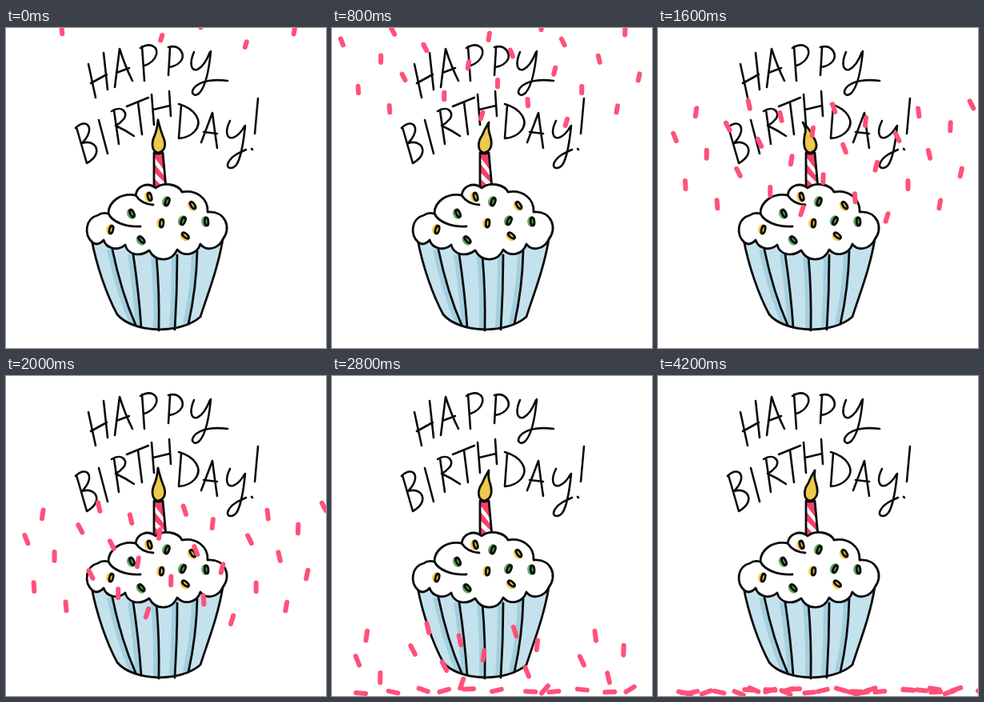
These frames come from a looping animation (400x400 px, 4300 ms). An HTML page:

```html
<!DOCTYPE html>
<html lang="en">
<head>
<meta charset="utf-8">
<title>Happy birthday</title>
<style>
  html, body { margin: 0; width: 100%; height: 100%; overflow: hidden; background: #fff; }
  svg { display: block; width: 100vw; height: 100vh; }
  .ink, .edge { stroke: #0b0b0b; stroke-width: 2.8; stroke-linecap: round; stroke-linejoin: round; }
  .ink { fill: none; }
  .letters { stroke-width: 2.6; }
  .band { fill: none; stroke: #a3cfdf; stroke-width: 6; }
  .confetti { stroke: #ff5179; stroke-width: 6; stroke-linecap: round; }
</style>
</head>
<body>
<svg viewBox="0 0 400 400" role="img" aria-label="Happy birthday!">
  <defs>
    <path id="ribs" d="M133 277Q144 330 162 371M159 283Q166 330 169 374M188 285Q192 330 191 378M214 284Q214 330 211 377M239 279Q238 325 228 370"/>
    <path id="cup" d="M107 264C113 297 126 334 139 358C158 381 217 384 243 361C253 330 265 300 271 264"/>
  </defs>

  <g class="ink letters">
    <!-- HAPPY -->
    <path d="M103 45L112 87M122 31L127 77M106 69L126 58"/>
    <path d="M136 74L142 26Q149 48 158 66M138 56L154 50"/>
    <path d="M170 23L173 66M168 25C181 17 190 24 188 33Q185 43 173 47"/>
    <path d="M205 25L203 59M203 24C216 20 223 31 220 39Q216 47 204 49"/>
    <path d="M235 30C229 44 231 54 239 52Q248 48 255 30M256 29C254 50 250 72 242 81C236 87 230 82 235 75C243 65 262 64 277 66"/>
    <!-- BIRTHDAY! -->
    <path d="M88 124L101 169M87 125C101 111 113 126 95 144C112 138 123 157 101 169"/>
    <path d="M116 115L127 157"/>
    <path d="M135 103L141 145M132 104C146 95 154 108 146 115Q142 120 137 122Q148 127 160 135"/>
    <path d="M151 98L178 87M165 93L170 133"/>
    <path d="M182 83L185 121M204 79L206 110M184 102L205 97"/>
    <path d="M219 97L216 137M216 95C236 101 247 116 236 129Q229 137 216 138"/>
    <path d="M244 143L258 106Q261 130 264 150M247 130L264 132"/>
    <path d="M280 116C273 130 276 139 284 137Q292 134 298 123M299 122C297 142 294 162 288 171C282 178 274 175 278 168C282 160 291 156 300 152"/>
    <path d="M315 88L311 132M307 151L308 152"/>
  </g>

  <path fill="#f83f6b" d="M185 156H196L200 201H185Z"/>
  <path fill="#fff" d="M185 161L197 177V184L185 169ZM185 180L199 194V201L185 188Z"/>
  <path class="ink" d="M185 200V156Q190 158 196 156L200 200"/>
  <path id="flame" class="edge" fill="#edca4c"/>

  <use href="#cup" fill="#c3e2ed"/>
  <use href="#ribs" class="band" x="-4"/>
  <use href="#ribs" class="ink"/>
  <use href="#cup" class="ink"/>

  <path class="edge" fill="#fff" d="M108 268C97 258 99 238 115 234Q120 230 128 232C128 217 143 206 162 209C164 197 177 192 187 200C197 192 215 195 220 205C238 202 253 213 252 230C275 228 282 251 271 264C266 276 250 280 243 270C239 283 223 287 214 277C207 293 187 293 179 278C166 287 152 283 149 271C139 280 125 275 122 265Q115 273 108 268Z"/>
  <path class="ink" d="M128 232C133 242 148 249 168 248M162 209Q169 220 184 221"/>
  <g id="sprinkles"></g>
  <g id="confetti" class="confetti"></g>
</svg>
<script>
const STEP = 100, STEPS = 43, COUNT = 29, MID = 16;
const get = id => document.getElementById(id);
const clamp = v => Math.max(0, Math.min(1, v));
const mix = (a, b, p) => a + (b - a) * p;
const frac = v => v - Math.floor(v);
const noise = n => frac(Math.sin(n * 127.1 + 3.7) * 43758.55);

function add(parent, tag, attrs) {
  const el = document.createElementNS("http://www.w3.org/2000/svg", tag);
  for (const k in attrs) el.setAttribute(k, attrs[k]);
  parent.append(el);
  return el;
}

function sprinkle(color, [x, y, tilt]) {
  const g = add(get("sprinkles"), "g", { transform: `translate(${x} ${y}) rotate(${tilt})` });
  add(g, "ellipse", { cx: -0.8, rx: 5, ry: 6.8, fill: color });
  add(g, "ellipse", { cx: 0.6, rx: 2.3, ry: 5, class: "ink", "stroke-width": 2 });
}
[[179, 211, -15], [233, 222, -35], [194, 244, 5], [131, 252, 15], [224, 260, -50]].forEach(s => sprinkle("#f5cb58", s));
[[201, 217, 20], [157, 232, -25], [221, 241, 25], [250, 242, -5], [169, 265, -40]].forEach(s => sprinkle("#5daa60", s));

// Confetti is spread evenly across, with heights from a low-discrepancy sequence
const bits = Array.from({ length: COUNT }, (_, i) => {
  const tilt = mix(-28, 18, noise(i));
  return {
    x: mix(21, 392, i / (COUNT - 1)),
    y: 95 + 148 * frac(0.346 + 0.381 * i) ** 1.2,
    tilt,
    drift: -tilt / 20,
    floor: 391 + 6 * noise(i + 60),
    rest: (tilt < 0 ? -1 : 1) * mix(66, 90, noise(i + 40)),
    el: add(get("confetti"), "path", {})
  };
});

const fall = k => 10.8 * k + 0.17 * k * k;

function moveBit(b, k) {
  const drop = b.y + fall(k) - fall(MID);
  const landed = clamp((drop - b.floor + 12) / 26);
  const x = b.x + b.drift * (Math.min(k, 26) - MID);
  const half = 3.4 + 0.1 * Math.min(k, 26);
  b.el.setAttribute("d", `M0 ${-half}V${half}`);
  b.el.setAttribute("transform",
    `translate(${x} ${Math.min(drop, b.floor)}) rotate(${mix(b.tilt, b.rest, landed)})`);
}

// Sideways lean of the flame tip, one per step
const leans = [0, -9, 6, 6, -9];

function moveFlame(k) {
  const lean = leans[k % leans.length], bend = lean * 0.3;
  const tip = `${190 + lean} ${lean ? 118 : 115}`;
  get("flame").setAttribute("d",
    `M190 156C181 154 182 142 ${186 + bend} 134Q${189 + bend} 126 ${tip}` +
    `Q${193 + bend} 127 ${196 + bend} 135C201 146 199 154 190 156Z`);
}

const start = performance.now();
function draw() {
  const k = Math.floor((performance.now() - start) / STEP) % STEPS;
  moveFlame(k);
  bits.forEach(b => moveBit(b, k));
  requestAnimationFrame(draw);
}
draw();
</script>
</body>
</html>
```
